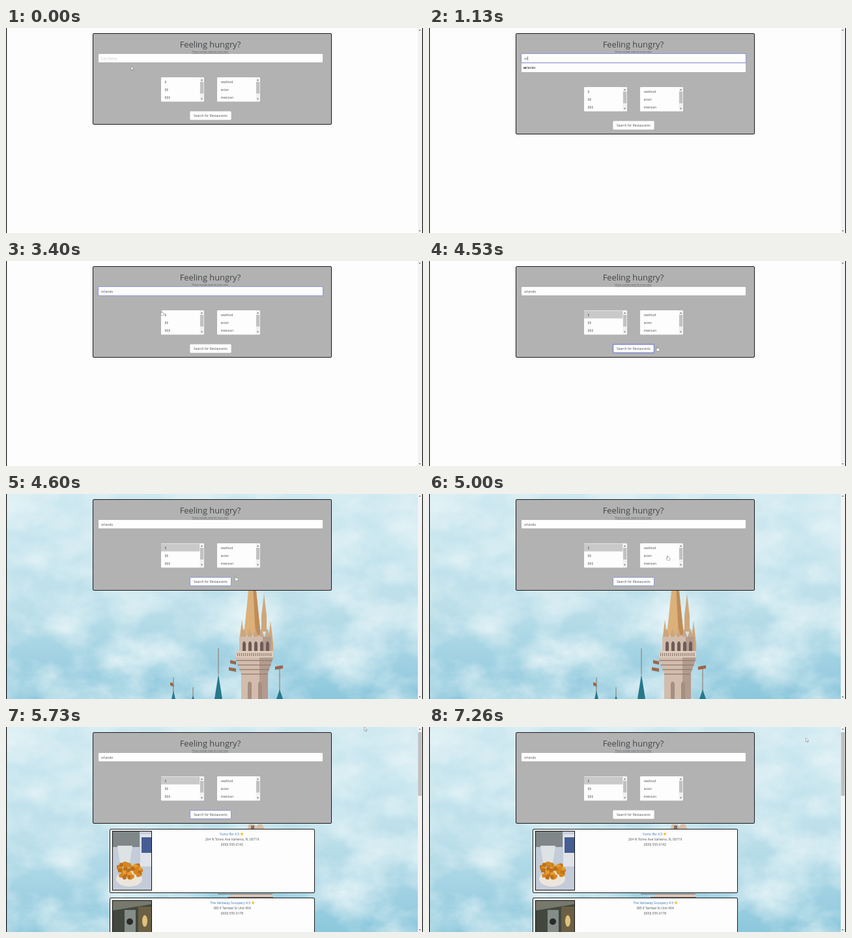
Write an HTML page that moves like this. It is 640 by 316 pixels and loops after 7.33 s.

```html
<!DOCTYPE html>
<html lang="en">
<head>
<meta charset="utf-8">
<title>Restaurant search</title>
<style>
html, body { margin: 0; width: 100%; height: 100%; overflow: hidden; background: #fdfdfd; }
svg { display: block; width: 100%; height: 100%; }
text { font: 5px 'Open Sans', 'Noto Sans', sans-serif; fill: #4b4f53; white-space: pre; }
.mid { text-anchor: middle; }
.link { fill: #3274b8; }
.off { display: none; }
</style>
</head>
<body>
<svg id="stage" viewBox="0 0 640 316" preserveAspectRatio="none"></svg>
<script>
const LOOP = 7330, CITY = 'orlando';
const rect = (x, y, w, h, fill, more = '') =>
  `<rect x="${x}" y="${y}" width="${w}" height="${h}" fill="${fill}" ${more}/>`;
const box = (x, y, w, h, fill) => rect(x, y, w, h, fill, 'rx="1.5" stroke="#1a1a1a"');
const oval = (x, y, rx, ry, fill) => `<ellipse cx="${x}" cy="${y}" rx="${rx}" ry="${ry}" fill="${fill}"/>`;
const path = (d, fill, more = '') => `<path d="${d}" fill="${fill}" ${more}/>`;
const text = (x, y, s, more = '') => `<text x="${x}" y="${y}" ${more}>${s}</text>`;
const group = (id, body) => `<g id="${id}">${body}</g>`;
const repeat = (n, f) => Array.from({ length: n }, (_, i) => f(i)).join('');

let seed = 7;
const random = () => (seed = seed * 16807 % 2147483647) / 2147483647;

const defs = `<defs>
  <linearGradient id="air" x2="0" y2="1">
    <stop stop-color="#cde8f0"/><stop offset=".55" stop-color="#bcdfea"/><stop offset="1" stop-color="#8cc7dc"/>
  </linearGradient>
  <filter id="cloud" x="0" y="0" width="1" height="1" color-interpolation-filters="sRGB">
    <feTurbulence type="fractalNoise" baseFrequency=".012 .018" numOctaves="5" seed="4"/>
    <feColorMatrix values="0 0 0 0 .91  0 0 0 0 .96  0 0 0 0 .97  1.7 0 0 0 -.55"/>
  </filter></defs>`;
const sky = rect(0, 0, 640, 316, 'url(#air)') + rect(0, 0, 640, 316, '#fff', 'filter="url(#cloud)"');

// Pole with a teal cone that widens to the bottom edge
const turret = (x, top, half) => rect(x - .5, top, 1, 40, '#8a7462') +
  path(`M${x} ${top + 40 * half / 6}L${x + half} 316H${x - half}z`, '#27798a');
const flag = (x, y, w) => path(`M${x} ${y}l${w} -2v5l${-w} 2z`, '#9c664b');
const pinnacle = (x, y) => path(`M${x} ${y}l4 34v24h-8v-24z`, '#cfa679');

function castle() {
  const stone = '#d2bcab', shade = '#b39b8e';
  return turret(326, 238, 6) + turret(257, 283, 3) + turret(287, 298, 2) + turret(420, 268, 5) +
    flag(257, 292, -5) + flag(413, 266, 12) + flag(353, 258, -9) + flag(353, 269, -11) +
    path('M373 140h10l8 78h-26z', '#dcb079') + path('M379 140h4l8 78h-8z', '#bf8c58') +
    pinnacle(396, 154) + pinnacle(362, 194) + pinnacle(406, 196) +
    rect(358, 220, 49, 24, stone) + rect(394, 220, 13, 24, shade) +
    repeat(5, i => path(`M${363 + i * 9} 242v-12q2.5 -6 5 0v12z`, '#705c59') +
      path(`M${361 + i * 9} 220l4 -13 4 13z`, '#cba682')) +
    rect(353, 242, 57, 10, '#dfcdbd') + repeat(18, i => rect(355 + i * 3, 245, 1.2, 5, '#917b70')) +
    path('M352 252h58l-8 24v40h-41v-40z', stone) + path('M389 252h21l-8 24v40h-13z', shade) +
    repeat(4, i => rect(353 + i * 2.6, 256 + i * 7, 56 - i * 5, 1.2, '#8f786d')) +
    repeat(2, i => path(`M${371 + i * 16} 316v-24q3 -6 6 0v24z`, '#a58e82'));
}

// The parts of the enlarged tower that show between the boxes
const peaks = path('M370 158l3-8h8l3 4 3-4h6l4 8z', '#d8bea5') + rect(376, 152, 5, 6, '#85706c') +
  path('M340 264l10-7h58l3 7z', '#d6c6b9') + rect(325, 257, 84, 1, '#7b6d66') + rect(340, 262, 70, 1, '#7b6d66');

const arrow = (x, y, d) => path(`M${x - 1.5} ${y}h3l-1.5 ${d}z`, '#555');
const list = (x, items) => rect(x, 76, 66, 37.5, '#fdfdfd', 'rx="1.3"') +
  (items[0] === '$' ? rect(x, 76.5, 59.5, 12, '#c9c9c9', 'id="pick"') : '') +
  rect(x + 59.5, 76.5, 6, 36.5, '#f0f0f0') + rect(x + 60, 83, 5.2, 18, '#c1c1c1') +
  arrow(x + 62.5, 81, -1.8) + arrow(x + 62.5, 108.5, 1.8) +
  items.map((s, i) => text(x + 5.5, 84.7 + i * 12.3, s)).join('');

const form = group('panel', box(133.5, 8.5, 366, 140, '#b2b2b2')) +
  text(313.5, 30.3, 'Feeling hungry?', 'class="mid" style="font-size:12.8px;fill:#414548"') +
  text(313.5, 38.4, 'Please exclude state for most cities', 'class="mid" style="font-size:3.45px;text-decoration:underline"') +
  rect(141.5, 39.5, 345, 14, 'none', 'id="ring" rx="1.5" stroke="#8f97d6" stroke-width="1.2"') +
  rect(142, 40, 344, 13, '#fdfdfd', 'rx="1.3"') +
  text(146, 48.8, 'City Name', 'id="hint" style="fill:#c3c8cc"') + text(146, 48.8, '', 'id="typed"') +
  rect(0, 44, .6, 6, '#333', 'id="caret"') +
  group('suggest', rect(142, 54.3, 344, 13.7, '#fdfdfd', 'id="row"') +
    '<text x="145" y="62.6" style="fill:#111"><tspan id="bold" font-weight="700"></tspan><tspan id="rest"></tspan></text>') +
  group('lower', list(238, ['$', '$$', '$$$']) + list(324, ['seafood', 'asian', 'mexican']) +
    rect(282.5, 128.5, 63, 13, '#fdfdfd', 'id="button" rx="1.4"') +
    text(314, 136.6, 'Search for Restaurants', 'class="mid" style="font-size:4.9px"'));

const star = 'M' + Array.from({ length: 10 }, (_, i) => {
  const r = i % 2 ? 1.4 : 3, a = i * Math.PI / 5;
  return [r * Math.sin(a), -r * Math.cos(a)].map(v => v.toFixed(2));
}).join('L') + 'z';

const card = (y, name, end, lines) => box(159.5, y + .5, 314, 98, '#fdfdfd') +
  text(end, y + 9.9, name + ' 4.5', 'class="link" text-anchor="end"') +
  path(star, '#f1c62f', `transform="translate(${end + 4} ${y + 8})"`) +
  lines.map((s, i) => text(347, y + 17.9 + i * 8, s, 'class="mid"')).join('');

// Snack on a table
const snack = rect(163, 161, 61, 91, '#c3ccd8') + rect(163, 161, 42, 24, '#7f8789') +
  path('M171 183h23l-4 27h-15z', '#dde2e4') + rect(206, 165, 18, 50, '#e0e3ea') + rect(208, 170, 16, 24, '#465d93') +
  oval(189, 234, 20, 12, '#ebe5dd') +
  repeat(60, () => {
    const a = random() * 2 * Math.PI, r = Math.sqrt(random());
    return rect(186 + 19 * r * Math.cos(a), 218 + 12 * r * Math.sin(a), 6, 6,
      ['#d5861f', '#e39d35', '#bd7019'][Math.floor(random() * 3)], 'rx="2.2"');
  });
// Shop front with warm lights
const shop = rect(163, 267, 61, 60, '#43483f') + path('M163 267h61v6l-61 10z', '#77796c') +
  rect(182, 282, 17, 34, '#858d89') + rect(203, 277, 21, 39, '#6b6045') +
  oval(190, 300, 5, 5, '#272b2a') + oval(213, 299, 4, 9, '#e0c27b');
const edge = y => rect(163.5, y, 60, 91, 'none', 'stroke="#111"');

const results = card(157, 'Yumo Bix', 358, ['264 N Tolms Ave Varlemo, FL 00719', '(000) 555-0142']) +
  card(263, 'The Velloway Scoopery', 375, ['385 E Tembel St Unit 904', '(000) 555-0178']) +
  group('photos', snack + edge(160.5) + shop + edge(267.5));

const sides = rect(632, 0, 7, 316, '#f3f3f3') + rect(632.4, 8, 5.6, 98, '#c1c1c1', 'id="thumb"') +
  arrow(635, 4, -1.8) + arrow(635, 312, 1.8) + rect(0, 0, 1.2, 316, '#0a0a0a') + rect(638.8, 0, 1.2, 316, '#0a0a0a');

const outline = 'stroke="#666" stroke-width=".5"';
const pointer = group('pointer',
  path('M0 0v6.2l1.5-1.4 1 2.2 1-.5-1-2h2z', '#fff', `id="arrow" ${outline}`) +
  path('M-.6.4q.6-.8 1.2 0v2.4l2.6.5q.9.3.8 1.2l-.5 2.7h-3.4l-2.3-3q0-1 1.6 0z', '#fff', `id="hand" ${outline}`));

document.getElementById('stage').innerHTML = defs + rect(0, 0, 640, 316, '#fdfdfd') +
  group('sky', sky) + group('castle', castle()) + group('peaks', peaks) +
  form + group('results', results) + sides + pointer;

const el = id => document.getElementById(id);
const show = (id, on) => el(id).classList.toggle('off', !on);
const set = (id, name, value) => el(id).setAttribute(name, value);
const write = (id, s) => { if (el(id).textContent !== s) el(id).textContent = s; };

const keyTimes = [1000, 1130, 1330, 1400, 1600, 1730, 1860];
// Pointer route: time, x, y
const route = [
  [0, 192, 59], [200, 185, 53], [2730, 234, 94], [3060, 200, 59], [3500, 250, 82], [3930, 305, 165],
  [4300, 324, 136], [4530, 350, 132], [5000, 366, 95], [5730, 550, 0], [7060, 550, 0], [LOOP, 587, 22]
];
function place(t) {
  const i = route.findIndex(k => k[0] > t), [a, x, y] = route[i - 1], [b, u, v] = route[i];
  const p = (t - a) / (b - a);
  return [x + (u - x) * p, y + (v - y) * p];
}

function draw(now) {
  // The picture ticks 15 times a second
  const t = Math.floor((now % LOOP + 7) * .015) / .015 % LOOP;
  const within = (a, b) => t >= a && t < b;
  const n = keyTimes.filter(k => t >= k).length, open = within(1000, 3200), found = t >= 5060;

  set('panel', 'transform', '');
  set('panel', 'transform', 'translate(0 0)');
  el('panel').firstChild.setAttribute('height', open ? 155 : 140);
  set('lower', 'transform', `translate(0 ${open ? 15 : 0})`);
  show('ring', within(530, 3470));
  show('hint', !n);
  write('typed', CITY.slice(0, n));
  show('caret', within(530, 2400));
  set('caret', 'x', 146.3 + (n ? el('typed').getComputedTextLength() : 0));
  show('suggest', open);
  set('row', 'fill', t >= 2730 ? '#e6e6e6' : '#fdfdfd');
  write('bold', CITY.slice(0, n));
  write('rest', CITY.slice(n));

  show('pick', t >= 3470);
  set('button', 'stroke', within(4260, 7130) ? '#7f88cf' : '#e4e4e4');
  set('button', 'stroke-width', within(4260, 4600) ? 1.4 : .8);

  show('sky', t >= 4600);
  show('castle', within(4600, 5060));
  for (const id of ['peaks', 'results', 'thumb']) show(id, found);
  show('photos', t >= 5260);

  const hand = within(2730, 5200);
  show('pointer', !within(200, 2730));
  show('hand', hand);
  show('arrow', !hand);
  set('pointer', 'transform', `translate(${place(t)})`);
}

let start;
function tick(now) {
  start ??= now;
  draw(now - start);
  requestAnimationFrame(tick);
}
draw(0);
requestAnimationFrame(tick);
</script>
</body>
</html>
```
